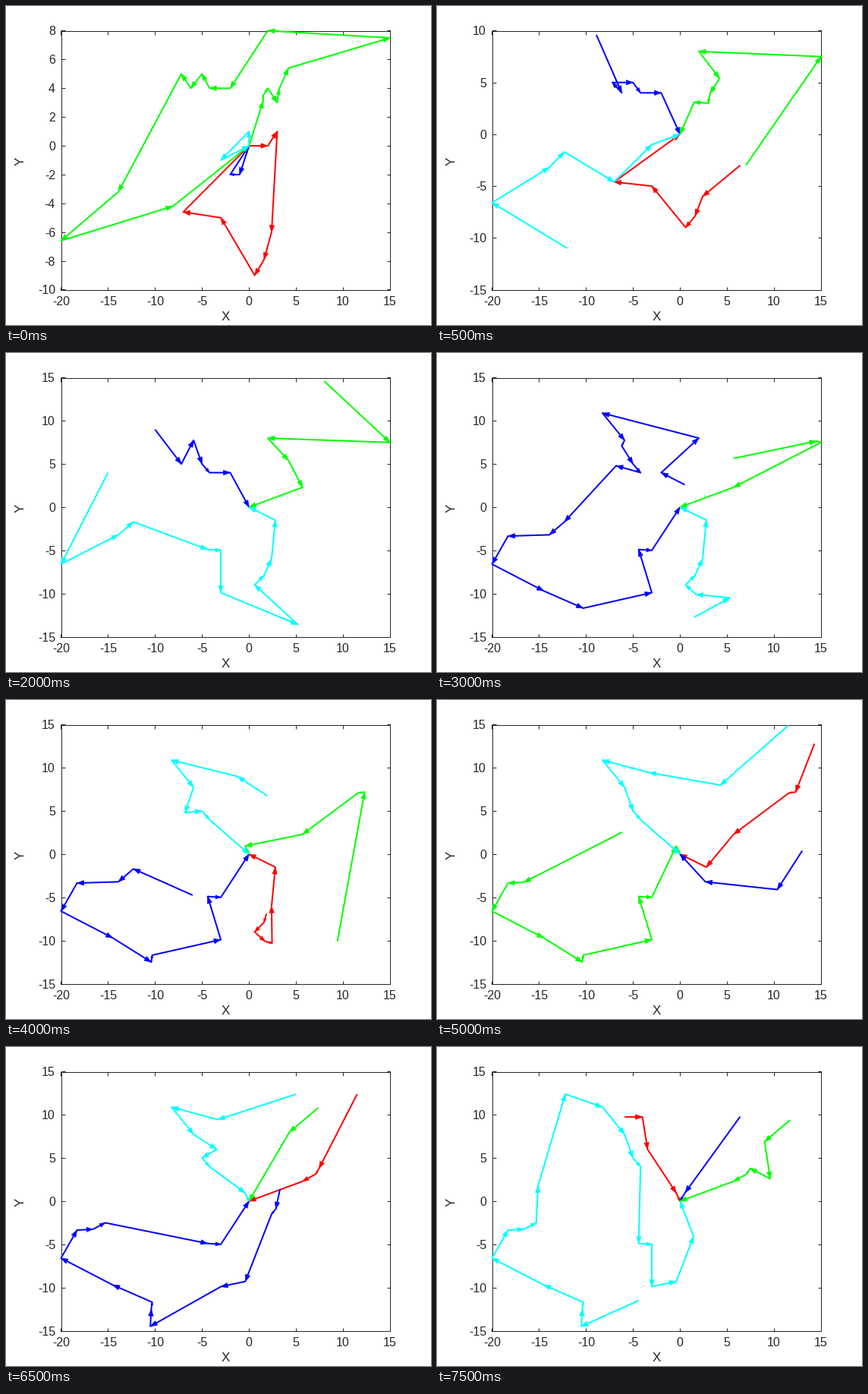
Animation of 560 by 420 pixels, one loop 8 s. Source, as a matplotlib script:

```python
import matplotlib.pyplot as plt
import numpy as np
from matplotlib.animation import FuncAnimation

W, H, DPI = 560, 420, 100
PX = 72 / DPI
LEFT, RIGHT, TOP, BOTTOM = 72.5, 506, 32.5, 373.5
XLIM = (-20, 15)
GRAY = "0.15"
COLORS = {"r": "#ff0000", "b": "#0000ff", "g": "#00ff00", "c": "#00ffff"}
INTERVAL = 500

# Stops known at the beginning; O is the depot.
STOPS = {
    "O": (0, 0), "A": (1.5, 3.1), "B": (1.5, 3.5), "C": (2, 4), "D": (3, 3),
    "E": (3.2, 3.95), "F": (4.2, 5.4), "G": (15, 7.5), "H": (2, 8),
    "I": (-2, 4), "J": (-4.2, 4), "K": (-5, 5), "L": (-6.2, 4), "M": (-7.2, 5),
    "N": (-13.9, -3.2), "P": (-20, -6.6), "Q": (-8.1, -4.2), "R": (2, 0),
    "S": (3, 1), "T": (2.4, -6), "U": (1.6, -7.9), "V": (0.6, -9),
    "W": (-3, -5), "X": (-7, -4.6), "Y": (-1, -2), "Z": (-2, -2),
    "a": (0, 1), "b": (-3, -1),
}

# Stops that turn up while the vehicles are under way.
STOPS |= {
    "c": (-12.3, -1.7), "d": (-4.4, -4.9), "e": (-3, -9.9), "f": (5.2, -13.6),
    "g": (2.8, -1.5), "h": (-5.9, 7.75), "i": (-1.7, -0.5), "j": (-8.25, 10.9),
    "k": (-6.2, 7.1), "l": (-6.8, 4.8), "m": (-18.3, -3.35), "n": (-14.5, -9.7),
    "o": (-10.3, -11.7), "p": (14.5, 7.65), "q": (5.7, 2.3), "r": (5.3, -10.5),
    "s": (1.7, -10.1), "t": (-1.2, 9), "u": (12.3, 7.2), "v": (11.6, 7.1),
    "w": (-0.4, 0.95), "x": (2.45, -10.3), "y": (-10.4, -12.5), "z": (4.3, 8),
    "0": (-3.3, 9.45), "1": (10.35, -4.1), "2": (2.7, -3.2), "3": (-16.6, -3.25),
    "4": (-3.45, 6), "5": (7.45, 3.8), "6": (7.1, 3.15), "7": (2.85, -0.9),
    "8": (2.4, -1.5), "9": (-0.4, -9.3), "+": (-10.5, -14.5), "*": (-15.3, -2.5),
    "#": (-4, 9.75), "$": (0.55, 1), "%": (9, 6.9), "&": (9.6, 2.6),
    "@": (-15.1, 1.8), "!": (-12.2, 12.4), "?": (1.45, -4.1),
}

# One row per step: colour, stops in order, vehicle position.
PLANS = [
    [("r", "RSTUVWXO", 0, 0), ("b", "YZO", 0, 0),
     ("g", "ABCDEFGHIJKLMNPQO", 0, 0), ("c", "abO", 0, 0)],
    [("r", "TUVWXO", 6.4, -3), ("b", "LMKJIO", -8.9, 9.6),
     ("g", "GHFEDAO", 7, -3), ("c", "PNcXbO", -12, -11)],
    [("r", "iO", -5.5, 3), ("b", "LMhKJIO", -9.5, 6),
     ("g", "GHFEDO", 11, 2), ("c", "PNcdWVUTO", -16, 2)],
    [("r", "iO", -8.7, 1.25), ("b", "LMhKJIO", -8.3, 3.1),
     ("g", "GHFEDO", 8.75, 9.8), ("c", "PNcdWefVUTgO", -12.3, 7.2)],
    [("b", "MhKJIO", -10, 9), ("g", "GHFqO", 8, 14.6),
     ("c", "PNcdWefVUTgO", -15, 4)],
    [("b", "HIhKJlcNmPoedWO", 0.8, 9.8), ("g", "GqO", 9, 4),
     ("c", "rfsVUTgO", 3.2, -7)],
    [("b", "IHjhkKJlcNmPnoedWO", 0.5, 2.6), ("g", "pGqO", 5.7, 5.65),
     ("c", "rsVUTgO", 1.5, -12.75)],
    [("r", "sVUTgO", 6, -12), ("b", "GqO", 10, 11),
     ("g", "cNmPnoedWO", -7.5, 2), ("c", "jhlKJO", 3, 14.9)],
    [("r", "UVsxTgO", 1.85, -6.9), ("b", "cNmPnyoedWO", -6, -4.75),
     ("g", "uvqwO", 9.4, -10.1), ("c", "tjhlKJO", 1.95, 6.75)],
    [("r", "gO", 6, -5), ("b", "cNmPnyoedWO", -8.5, 3),
     ("g", "vqwO", 12.3, 12), ("c", "z0jhKJO", 8, 14.8)],
    [("r", "uvqgO", 14.3, 12.8), ("b", "12O", 13, 0.4),
     ("g", "3mPnyoedWwO", -6.15, 2.55), ("c", "z0jhKJO", 11.5, 14.9)],
    [("r", "uvqO", 14.9, 9), ("b", "2O", 7, -7),
     ("g", "3mPnyoedWwO", -8, -1), ("c", "0jhKJO", 3, 14.6)],
    [("r", "56qO", 14, 8), ("b", "89e+yonPm3dWO", 3.2, 4),
     ("g", "zO", 9.5, 14), ("c", "0jh4KJwO", 1.5, 14)],
    [("r", "56qO", 11.5, 12.4), ("b", "789e+yonPm3*dWO", 3.3, 1.4),
     ("g", "zO", 7.35, 10.8), ("c", "0jh4KJwO", 5, 12.4)],
    [("r", "4wO", -1, 11), ("b", "zO", 7, 13),
     ("g", "56qO", 13, 6), ("c", "9e+yonPm3*@jhKJdWO", 0, -6)],
    [("r", "#4wO", -5.9, 9.75), ("b", "$O", 6.4, 9.8),
     ("g", "%&56qO", 11.7, 9.4), ("c", "+yonPm3*@!jhKJdWe9?O", -4.4, -11.5)],
]

plt.rcParams.update({"font.family": "Liberation Sans", "axes.unicode_minus": False})
fig = plt.figure(figsize=(W / DPI, H / DPI), dpi=DPI, facecolor="white")
ax = fig.add_axes([LEFT / W, 1 - BOTTOM / H, (RIGHT - LEFT) / W, (BOTTOM - TOP) / H])
ax.tick_params(direction="in", top=True, right=True, length=4.5 * PX, width=PX,
               color=GRAY, labelcolor=GRAY, labelsize=16 * PX)
ax.tick_params(axis="x", pad=8 * PX)
ax.tick_params(axis="y", pad=7.5 * PX)
for spine in ax.spines.values():
    spine.set(linewidth=PX, color=GRAY)
for label, x, y, angle in (("X", 289, 409, 0), ("Y", 19.5, 204, 90)):
    fig.text(x / W, 1 - y / H, label, size=17 * PX, color=GRAY, rotation=angle,
             ha="center", va="center")

drawn = []


def set_range(low, high, step):
    ax.set(xlim=XLIM, ylim=(low, high))
    ax.set_xticks(range(-20, 16, 5))
    ax.set_yticks(range(low, high + 1, step))


def arrow_head(start, tip, scale):
    """Triangle ending at tip, sized in pixels and returned in data units."""
    delta = (tip - start) * scale
    length = np.hypot(*delta)
    along = delta / length
    across = np.array([-along[1], along[0]])
    size = min(9, 0.4 * length)
    base = -size * along
    side = 0.36 * size * across
    return tip + np.array([0 * base, base + side, base - side]) / scale


def draw_route(color, stops, x, y, scale):
    points = np.array([(x, y)] + [STOPS[s] for s in stops], float)
    drawn.extend(ax.plot(*points.T, color=color, lw=2 * PX, clip_on=False,
                         solid_joinstyle="round", solid_capstyle="butt", zorder=3))
    for start, tip in zip(points, points[1:]):
        head = arrow_head(start, tip, scale)
        drawn.extend(ax.fill(*head.T, fc=color, ec=color, lw=0.6 * PX,
                             clip_on=False, zorder=3))


def update(step):
    while drawn:
        drawn.pop().remove()
    if step == 0:
        low, high, gap = -10, 8, 2
    else:
        low, high, gap = -15, 10 if step < 4 else 15, 5
    set_range(low, high, gap)
    scale = np.array([(RIGHT - LEFT) / (XLIM[1] - XLIM[0]),
                      (BOTTOM - TOP) / (high - low)])
    for key, stops, x, y in PLANS[step]:
        draw_route(COLORS[key], stops, x, y, scale)
    return drawn


anim = FuncAnimation(fig, update, frames=len(PLANS), interval=INTERVAL,
                     init_func=lambda: update(0), repeat=True, repeat_delay=0)
plt.show()
```
